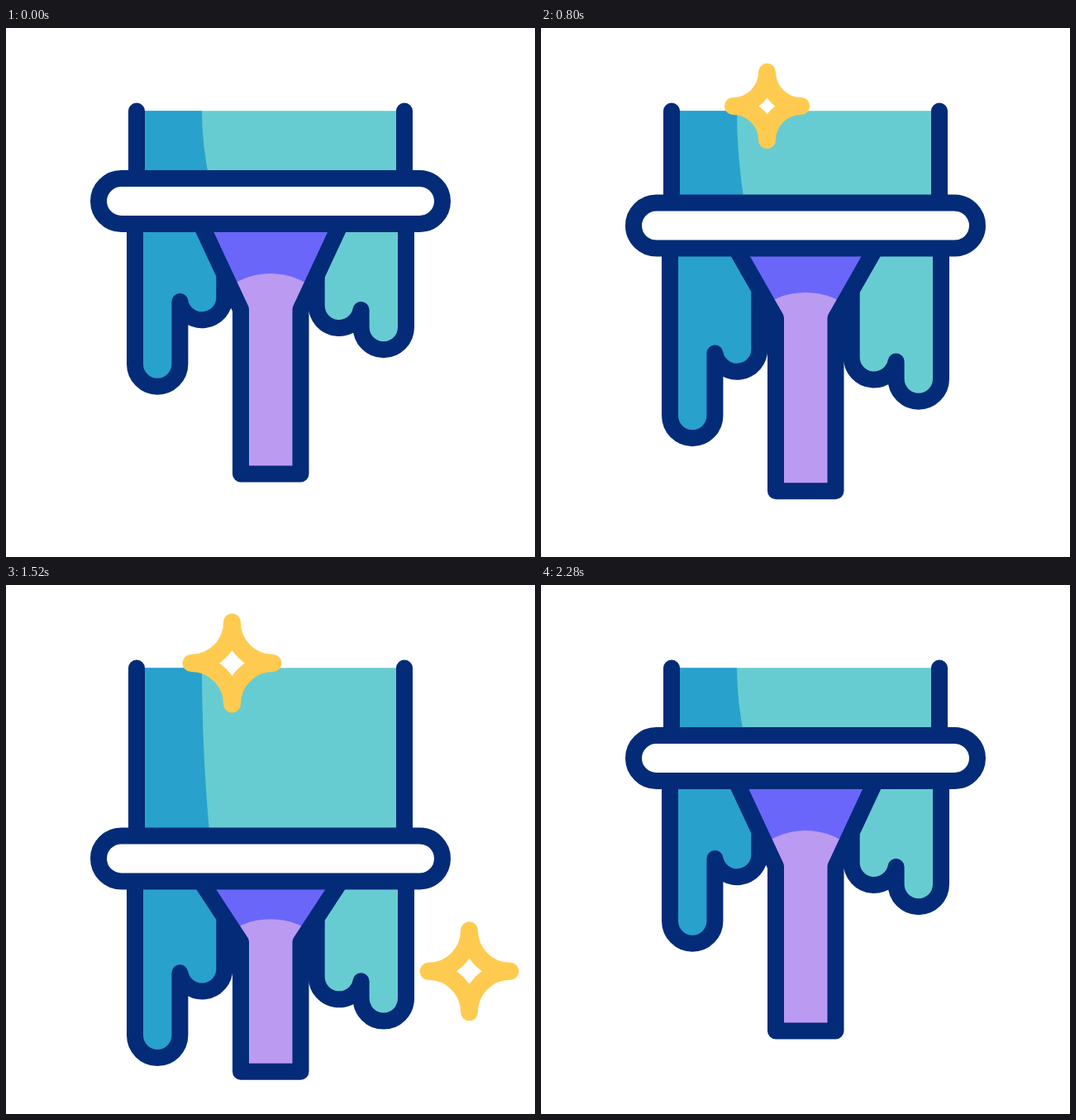
Recreate the animation shown at these times as an HTML page. Size 640 by 640 pixels, loop 2400 ms.

```html
<!DOCTYPE html>
<html lang="en">
<head>
<meta charset="utf-8">
<title>Squeegee</title>
<style>
  html, body { margin: 0; width: 100%; height: 100%; overflow: hidden; background: #fff; }
  svg { display: block; width: 100vw; height: 100vh; }
  .line { fill: none; stroke: #032b78; stroke-width: 20; stroke-linecap: round; stroke-linejoin: round; }
  .teal { fill: #67ccd1; }
  .blue { fill: #28a1cd; }
  .star { fill: #fff; stroke: #fecb50; stroke-width: 21; stroke-linejoin: round; }
</style>
</head>
<body>
<svg viewBox="0 0 640 640">
  <clipPath id="inside"><path id="clip"/></clipPath>
  <path id="leftFill" class="blue"/>
  <path id="rightFill" class="teal"/>
  <path id="leftLine" class="line"/>
  <path id="rightLine" class="line"/>
  <path id="pane" class="teal"/>
  <path id="shade" class="blue"/>
  <path id="posts" class="line"/>
  <path id="cone" fill="#6b66fa"/>
  <path id="grip" fill="#bb9af2" clip-path="url(#inside)"/>
  <path id="handle" class="line"/>
  <rect id="bar" class="line" x="112" width="416" height="55" rx="27.5" style="fill:#fff"/>
  <path id="star1" class="star"/>
  <path id="star2" class="star"/>
</svg>
<script>
  const LOOP = 2400, BAR = 209.5, STAR_LAG = 260;
  const el = {};
  document.querySelectorAll("[id]").forEach(e => el[e.id] = e);
  const draw = (id, d) => el[id].setAttribute("d", d);
  const mix = (a, b, p) => a + (b - a) * p;

  // Symmetric cubic-bezier(k, 0, 1 - k, 1)
  function ease(k, x) {
    let lo = 0, hi = 1;
    for (let i = 0; i < 24; i++) {
      const u = (lo + hi) / 2, v = 1 - u;
      if (3 * k * u * v * v + 3 * (1 - k) * u * u * v + u * u * u < x) lo = u; else hi = u;
    }
    return lo * lo * (3 - 2 * lo);
  }

  // Each key: time, easing into it, then values
  function sample(keys, t) {
    const i = keys.findIndex(key => key[0] > t);
    if (i < 0) return keys[keys.length - 1].slice(2);
    if (i === 0) return keys[0].slice(2);
    const a = keys[i - 1], b = keys[i];
    const p = ease(b[1], (t - a[0]) / (b[0] - a[0]));
    return a.slice(2).map((v, n) => mix(v, b[n + 2], p));
  }

  // bar shift, drip shift, then below the bar: shoulder, grip arc, foot
  const wipe = [
    [0, 0, 0, 0, 131, 87.5, 330],
    [540, .75, 62.5, 62.5, 101.5, 74.5, 316.5],
    [1108, .75, -31.5, 62.5, 131, 92.5, 330],
    [1750, .65, 155, 155, 94.5, 69, 242],
    [2280, .75, 0, 0, 131, 87.5, 330]
  ];

  // distance from centre to tip
  const twinkle = [
    [670, 0, 1],
    [897, .333, 66.3],
    [1055, .333, 49.5],
    [1535, .333, 49.5],
    [1735, .333, 66.3],
    [2015, .4, 1]
  ];

  function star(id, x, y, t) {
    const shown = t >= twinkle[0][0] && t < twinkle[twinkle.length - 1][0];
    el[id].style.display = shown ? "" : "none";
    if (!shown) return;
    const r = sample(twinkle, t)[0], arc = `A${r} ${r} 0 0 0 `;
    draw(id, `M${x} ${y - r}${arc}${x + r} ${y}${arc}${x} ${y + r}` +
      `${arc}${x - r} ${y}${arc}${x} ${y - r}Z`);
  }

  function drip(side, x, dir, top, long, notch, short, end) {
    const sweep = dir > 0 ? 0 : 1, mid = x + dir * 54.4, inner = x + dir * 108.3;
    const d = `M${x} ${top}V${long}A27.2 27.2 0 0 ${sweep} ${mid} ${long}V${notch}` +
      `A27.2 27.2 0 0 ${sweep} ${inner} ${short}V${end}`;
    draw(side + "Line", d);
    draw(side + "Fill", d + `V${top}Z`);
  }

  function render(t) {
    const [shift, fall, shoulder, arc, foot] = sample(wipe, t);
    const y = BAR + shift;

    const end = y + 32 + .588 * (shoulder - 27);
    drip("left", 156, 1, y, 406.5 + fall, 331 + fall, 324.5 + fall, end);
    drip("right", 484, -1, y, 362 + fall, 341 + fall, 336 + fall, end);

    const low = y - 22, half = (100 + low) / 2;
    draw("pane", `M158 100.3H482V${y}H158Z`);
    draw("shade", `M158 100.3H237Q237 ${half} 247 ${low}V${y}H158Z`);
    draw("posts", `M158 100.5V${y}M482 100.5V${y}`);

    const body = `M235.5 ${y + 27}L284 ${y + shoulder}V${y + foot}H356.5V${y + shoulder}L405 ${y + 27}`;
    draw("handle", body);
    draw("cone", body + "Z");
    draw("clip", body + "Z");
    draw("grip", `M233 ${y + arc + 87}A87 87 0 0 1 407 ${y + arc + 87}V640H233Z`);
    el.bar.setAttribute("y", y - 27.5);

    star("star1", 273.5, 94.5, t);
    star("star2", 560.5, 467.3, t - STAR_LAG);
  }

  const start = performance.now();
  function tick() {
    render((performance.now() - start) % LOOP);
    requestAnimationFrame(tick);
  }
  tick();
</script>
</body>
</html>
```
